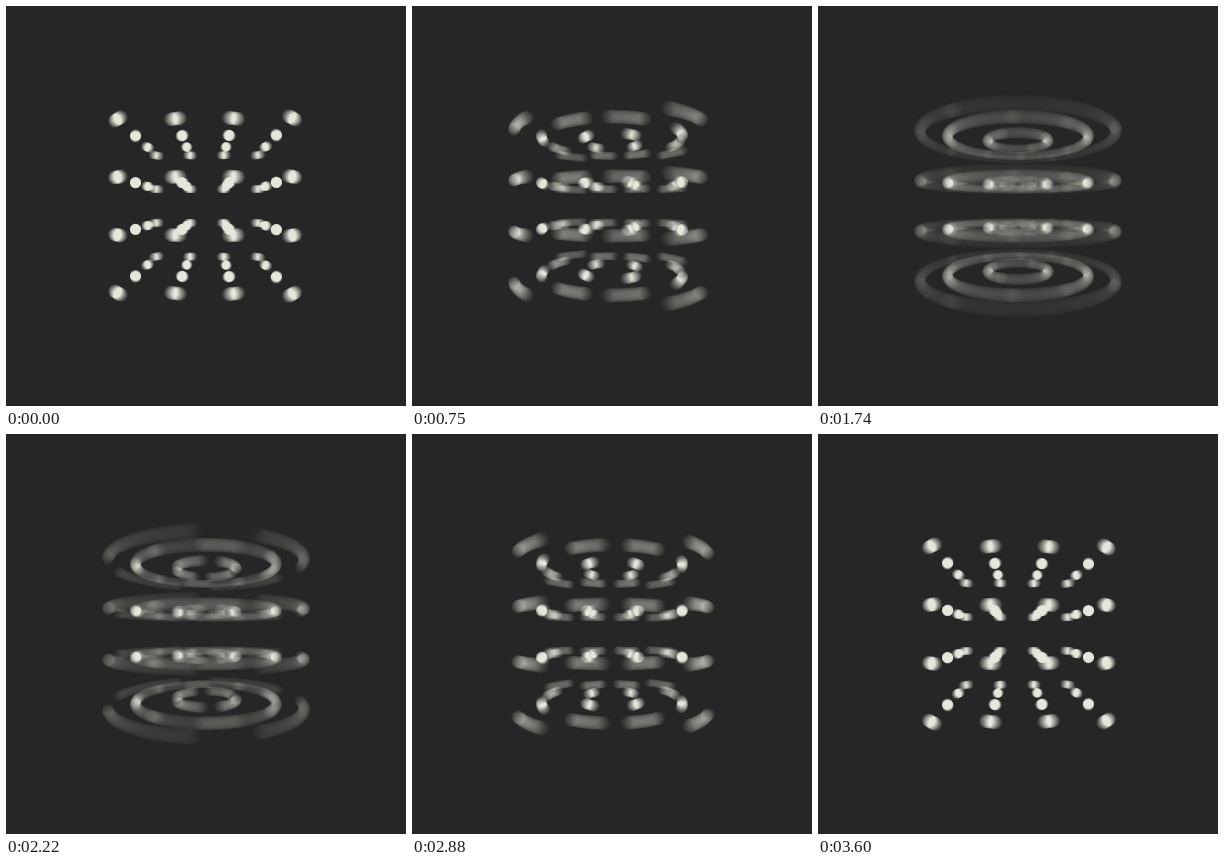
An HTML page with a canvas that plays this animation: 400 px wide and 400 px high, repeating every 3630 ms.

```html
<!DOCTYPE html>
<html>
<head>
<meta charset="utf-8">
<style>
  html, body { margin: 0; height: 100%; overflow: hidden; background: #262626; }
  canvas { display: block; }
</style>
</head>
<body>
<canvas id="stage" width="400" height="400"></canvas>
<script>
const ctx = document.getElementById('stage').getContext('2d');
const STEP = 30, STEPS = 121;
const FOCAL = 241.5, DISTANCE = 11.28, RADIUS = 0.233;
const SAMPLES = 64, SHUTTER = 0.027, PHASE = 0.004, EASE = 0.82;
const GRID = [-3, -1, 1, 3];

// Four turns per loop: a slow drift blended with a cubic ease.
function angle(p) {
  const q = p - Math.round(p);
  return 8 * Math.PI * ((1 - EASE) * q + EASE * 4 * q ** 3);
}

// All balls form one path, so overlaps within a sample do not add up.
function traceBalls(theta) {
  const c = Math.cos(theta), s = Math.sin(theta);
  ctx.beginPath();
  for (const x of GRID) for (const z of GRID) {
    const scale = FOCAL / (DISTANCE - z * c - x * s);
    const px = 200 + (x * c - z * s) * scale;
    const r = RADIUS * scale;
    for (const y of GRID) {
      const py = 200 + y * scale;
      ctx.moveTo(px + r, py);
      ctx.arc(px, py, r, 0, 2 * Math.PI);
    }
  }
}

function draw(now) {
  const p = Math.floor(now / STEP) % STEPS / STEPS + PHASE;
  ctx.globalCompositeOperation = 'source-over';
  ctx.fillStyle = '#262626';
  ctx.fillRect(0, 0, 400, 400);
  // Motion blur: each sample adds an equal share of the ball colour.
  ctx.globalCompositeOperation = 'lighter';
  for (let i = 0; i < SAMPLES; i++) {
    traceBalls(angle(p + ((i + 0.5) / SAMPLES - 0.5) * SHUTTER));
    ctx.fillStyle = `rgb(3, 3, ${i % 6 ? 3 : 2})`;
    ctx.fill();
  }
}

const start = performance.now();
function tick() {
  draw(performance.now() - start);
  requestAnimationFrame(tick);
}
tick();
</script>
</body>
</html>
```
